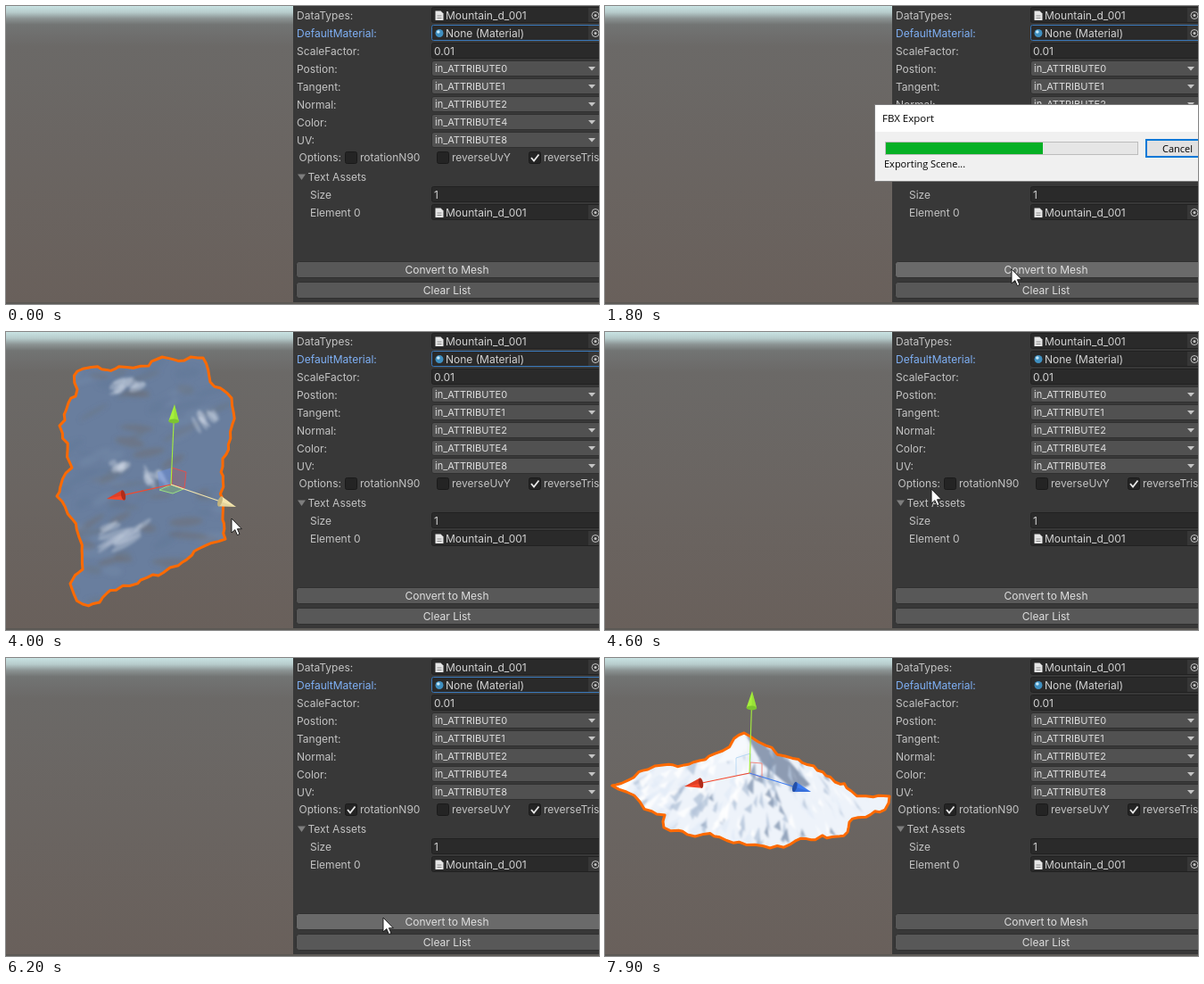
An HTML page that plays this animation: 665 by 334 pixels, repeating every 8.7 s.

```html
<!DOCTYPE html>
<html lang="en">
<head>
<meta charset="utf-8">
<title>Mesh converter</title>
<style>
html, body { margin: 0; width: 100%; height: 100%; overflow: hidden; background: #383838; }
svg { display: block; width: 665px; height: 334px; }
text { font: 12px Inter, sans-serif; fill: #c4c4c4; white-space: pre; }
.pop { font-size: 11px; fill: #dedede; }
.val { fill: #d2d2d2; }
.on { fill: #7fb0f5; }
.btn { text-anchor: middle; fill: #dedede; }
.dlg { font: 11px "Open Sans", sans-serif; fill: #000; }
.title { font-size: 11.5px; }
</style>
</head>
<body>
<svg id="stage" viewBox="0 0 665 334" xmlns="http://www.w3.org/2000/svg"></svg>
<script>
const LOOP = 8700, STEP = 100;

let seed = 7;
const rnd = (a = 0, b = 1) => {
  seed = (seed * 1664525 + 1013904223) >>> 0;
  return a + (b - a) * seed / 4294967296;
};

const rect = (x, y, w, h, fill, more = '') =>
  `<rect x="${x}" y="${y}" width="${w}" height="${h}" fill="${fill}" ${more}/>`;
const text = (x, y, s, cls = '') => `<text x="${x}" y="${y}" class="${cls}">${s}</text>`;
const path = (d, fill, more = '') => `<path d="${d}" fill="${fill}" ${more}/>`;
const line = (d, color, more = '') => path(d, 'none', `stroke="${color}" ${more}`);
const blob = (x, y, rx, ry, a, fill, o) =>
  `<ellipse rx="${rx}" ry="${ry}" fill="${fill}" opacity="${o}" transform="translate(${x} ${y}) rotate(${a})"/>`;
const group = (id, body) => `<g id="${id}" visibility="hidden">${body}</g>`;
const repeat = (n, fn) => Array.from({ length: n }, (_, i) => fn(i)).join('');

// Closed outline: every edge is split at random until its pieces are short
function rough(points) {
  const p = points.split(' ').map(s => s.split(',').map(Number));
  const split = (a, b) => {
    const dx = b[0] - a[0], dy = b[1] - a[1], len = Math.hypot(dx, dy);
    if (len < 10) return [a];
    const k = rnd(-1, 1) * Math.min(.2, 3.5 / len), f = rnd(.4, .6);
    const m = [a[0] + dx * f - dy * k, a[1] + dy * f + dx * k];
    return [...split(a, m), ...split(m, b)];
  };
  return 'M' + p.flatMap((a, i) => split(a, p[(i + 1) % p.length]))
    .map(q => q.map(n => n.toFixed(1)).join(' ')).join('L') + 'Z';
}

/* Scene */
const cliff = rough('80,44 160,38 168,31 221,29 229,56 253,74 254,103 243,142 246,232 ' +
  '216,243 184,264 105,303 86,305 72,282 86,266 82,230 57,184 74,152 60,105 78,72');
const peak = rough('156,84 172,94 202,110 258,139 276,149 319,155 314,170 274,184 272,195 ' +
  '185,213 101,200 66,190 67,176 39,161 24,150 8,143 48,125 106,115 132,104');

function cliffBody() {
  const tones = ['#737983', '#8096b8', '#677d9f', '#77736f'];
  const soft = repeat(90, i =>
    blob(rnd(62, 248), rnd(40, 300), rnd(8, 24), rnd(2, 6), rnd(-35, 12), tones[i % 4], .42));
  // Snow patches: x, y, size
  const glow = [[137, 61, 15], [225, 98, 14], [167, 164, 13], [130, 224, 28], [128, 150, 9]]
    .map(([x, y, s]) => repeat(9, () => blob(x + rnd(-s, s), y + rnd(-.5, .5) * s,
      s * rnd(.4, .8), rnd(2, 5), (x > 140 ? 55 : -25) + rnd(-15, 15), '#dde7f4', .4))).join('');
  return path(cliff, '#7087a9') +
    `<g clip-path="url(#cliffClip)"><g filter="url(#soft)">${soft}</g><g filter="url(#fine)">${glow}</g></g>`;
}

// Streaks run downhill from the summit; ridges alternate light and dark
function peakBody() {
  const tones = ['#ffffff', '#e3ecf7', '#b4c4da', '#8597b2'];
  const streaks = repeat(330, () => {
    const x = rnd(8, 320), y = rnd(90, 208), side = (x - 157) / 150, l = rnd(8, 24);
    const flank = Math.exp(-(((x - 196) / 30) ** 2)) * .4;
    const shade = rnd(0, .75) + flank + .2 * Math.sin(x * .17 + y * .08);
    const fill = tones[Math.max(0, Math.min(3, Math.floor(shade * 4 - .3)))];
    return path(`M${x} ${y}l${side * l + rnd(-4, 4)} ${l}l${-rnd(3, 9)} ${-l * .4}Z`, fill, 'opacity=".8"');
  });
  return path(peak, '#eef3fa') + `<g clip-path="url(#peakClip)"><g filter="url(#edge)">` +
    path('M158 86L200 108L230 142L214 150L176 118Z', '#8d9bb2') + streaks +
    path('M156 85L134 105L126 118L146 114L160 98Z', '#f6f9fd') + '</g></g>';
}

const outline = d => line(d, '#ff6a00', 'stroke-width="3" stroke-linejoin="round"');

// Gizmo arm from (x, y) with a cone whose tip is at (u, v)
function arm(x, y, u, v, color, dark) {
  const a = Math.atan2(v - y, u - x), L = 19;
  return line(`M${x} ${y}L${u - L * Math.cos(a)} ${v - L * Math.sin(a)}`, color, 'stroke-width="1.1"') +
    `<g transform="translate(${u} ${v}) rotate(${a * 180 / Math.PI})">` +
    path(`M0 0L${-L} -5.8V5.8Z`, color) + path(`M0 0L${-L} 0V5.8Z`, dark, 'opacity=".3"') +
    blob(-L, 0, 2.4, 5.8, 0, dark, 1) + '</g>';
}
const RED = ['#f5482c', '#b02c1a'], GREEN = ['#a6f03c', '#7cc430'],
  BLUE = ['#3f7df0', '#2450a8'], GOLD = ['#f4e6ae', '#c4b47c'];

const gizmoA =
  path('M170 157L186 152V171L172 176Z', '#6f97ea', 'opacity=".4"') +
  path('M186 171V152L202 157L200 175Z', '#c0504c', 'fill-opacity=".25" stroke="#e2504c"') +
  path('M172 177L185 171L199 176L187 181Z', '#8fd060', 'fill-opacity=".3" stroke="#9be080"') +
  arm(185, 171, 189, 81, ...GREEN) + arm(185, 171, 113, 187, ...RED);
const gizmoB =
  line('M147 132V112L163 107V129Z', '#b8d8f4') +
  line('M163 117L176 118V134L163 129Z', '#f08a80') +
  arm(162, 129, 165, 37, ...GREEN) + arm(162, 129, 89, 144, ...RED) + arm(162, 129, 231, 150, ...BLUE);

/* Inspector panel */
const field = (y, s, x = 480) =>
  rect(477.5, y + .5, 200, 17, '#2a2a2a', 'rx="2" stroke="#212121"') + text(x, y + 13.5, s, 'val');
const picker = y => rect(653, y + 1, 20, 16, '#373737') +
  `<circle cx="661" cy="${y + 9.5}" r="4" fill="none" stroke="#c4c4c4"/><circle cx="661" cy="${y + 9.5}" r="1.5" fill="#c4c4c4"/>`;
const page = y => path(`M481.5 ${y + 4.5}h6l3 3v7.5h-9Z`, '#e6e6e6') +
  line(`M483.5 ${y + 10}h5M483.5 ${y + 12.5}h5`, '#8a8a8a');
const asset = y => field(y, 'Mountain_d_001', 493) + page(y) + picker(y);
const popup = (y, s) => rect(477.5, y + .5, 200, 17, '#515151', 'rx="2.5" stroke="#303030"') +
  text(481, y + 13, s, 'pop') + path(`M653 ${y + 7}h8l-4 4.5Z`, '#c4c4c4');
const box = (x, s) => rect(x + .5, 163.5, 13, 13, '#242424', 'rx="2" stroke="#1a1a1a"') + text(x + 17, 174, s);
const tick = x => line(`M${x + 3} 170l3 3.5l5.5 -7`, '#e8e8e8', 'stroke-width="1.8"');
const button = (y, s, fill) => rect(325.5, y + .5, 345, 18, fill, 'rx="3" stroke="#303030"') +
  text(494.5, y + 14, s, 'btn');

const labels = ['DataTypes:', 'DefaultMaterial:', 'ScaleFactor:', 'Postion:', 'Tangent:', 'Normal:', 'Color:', 'UV:'];
const panel = rect(322, 0, 343, 332, '#383838') +
  labels.map((s, i) => text(326, 15 + i * 20, s, i === 1 ? 'on' : '')).join('') +
  asset(1) + field(21, 'None (Material)', 493) + picker(21) +
  '<circle cx="486" cy="30.5" r="4.5" fill="#3f8fc0"/><circle cx="484.8" cy="29" r="1.8" fill="#c4e8f8"/>' +
  field(41, '0.01') +
  [0, 1, 2, 4, 8].map((n, i) => popup(61 + i * 20, 'in_ATTRIBUTE' + n)).join('') +
  text(328.5, 174, 'Options:') + box(380, 'rotationN90') + box(483, 'reverseUvY') + box(586, 'reverseTris') + tick(586) +
  path('M327 188.5h9l-4.5 6.5Z', '#7e7e7e') + text(338.5, 196, 'Text Assets') +
  text(341, 216, 'Size') + field(202, '1') + text(341, 236, 'Element 0') + asset(222) +
  button(286, 'Convert to Mesh', '#585858') + button(309, 'Clear List', '#585858');

const dialog = rect(302.5, 110.5, 400, 86, '#f0f0f0', 'stroke="#7d7d7d"') +
  rect(303, 111, 400, 30, '#fff') + text(311, 130, 'FBX Export', 'dlg title') +
  rect(314.5, 152.5, 283, 14, '#e6e6e6', 'stroke="#bcbcbc"') + rect(315, 153, 176, 13, '#06b025') +
  text(313, 181, 'Exporting Scene...', 'dlg') +
  rect(607, 150, 80, 19, '#e1e1e1', 'stroke="#0078d7" stroke-width="2"') + text(625, 164, 'Cancel', 'dlg');

const sky = [[0, '#c9e3e3'], [7, '#b7cccc'], [14, '#8b9393'], [21, '#727473'], [45, '#6b6967'], [334, '#69605b']]
  .map(([y, c]) => `<stop offset="${y / 334}" stop-color="${c}"/>`).join('');
const blur = (id, s) => `<filter id="${id}" x="-10%" y="-10%" width="120%" height="120%"><feGaussianBlur stdDeviation="${s}"/></filter>`;
const clip = (id, d) => `<clipPath id="${id}"><path d="${d}"/></clipPath>`;

const stage = document.getElementById('stage');
stage.innerHTML =
  `<defs><linearGradient id="sky" x2="0" y2="1">${sky}</linearGradient>` +
  blur('soft', 2.5) + blur('fine', 1.8) + blur('edge', 1) + clip('cliffClip', cliff) + clip('peakClip', peak) + '</defs>' +
  rect(0, 0, 322, 334, 'url(#sky)') + rect(0, 332, 665, 2, '#5c5955') +
  group('cliff', cliffBody()) +
  group('cliffPick', path(cliff, '#3c4452', 'opacity=".12"') + outline(cliff) + gizmoA) +
  group('axisIdle', arm(185, 171, 258, 196, ...BLUE)) + group('axisHot', arm(185, 171, 258, 196, ...GOLD)) +
  group('peak', peakBody()) + group('peakPick', outline(peak) + gizmoB) +
  panel +
  group('focus', rect(477.5, 21.5, 200, 17, 'none', 'rx="2" stroke="#3a79bb"')) +
  group('rotated', tick(380)) +
  group('hover', button(286, 'Convert to Mesh', '#6a6a6a')) +
  group('dialog', dialog) +
  path('M0 0V16L3.8 12.6L6.4 18.6L9 17.5L6.4 11.7H11.3Z', '#fff', 'id="cursor" stroke="#111" stroke-width=".9"');

/* Timeline */
const shown = {
  cliff: [[2100, 4200]], cliffPick: [[2900, 4200]],
  axisIdle: [[2900, 4000]], axisHot: [[4000, 4200]],
  peak: [[6300, LOOP]], peakPick: [[7100, LOOP]],
  focus: [[0, 4500], [4900, 7700]],
  rotated: [[4900, LOOP]],
  hover: [[1600, 2200], [5700, 6700]],
  dialog: [[1800, 1900], [6000, 6200]],
};
// start, end, target x, target y
const moves = [
  [0, 800, 456, 295], [1200, 1200, 445.5, 285.5], [1400, 1400, 456, 295],
  [2100, 2600, 205, 185], [3900, 4000, 253, 209], [4000, 4800, 387, 170],
  [4900, 5400, 423, 291], [6600, 6900, 149, 158], [7400, 7900, 680, 92],
];
const parts = Object.entries(shown).map(([id, spans]) => [document.getElementById(id), spans]);
const cursor = document.getElementById('cursor');

function cursorAt(t) {
  let x = 668, y = 116;
  for (const [a, b, u, v] of moves) {
    if (t < a) break;
    const k = t >= b ? 1 : (t - a) / (b - a), e = k * k * (3 - 2 * k);
    x += (u - x) * e;
    y += (v - y) * e;
  }
  return [x, y];
}

const start = performance.now();
function draw() {
  const t = Math.floor((performance.now() - start) % LOOP / STEP) * STEP;
  for (const [el, spans] of parts) {
    el.setAttribute('visibility', spans.some(([a, b]) => t >= a && t < b) ? 'visible' : 'hidden');
  }
  cursor.setAttribute('transform', `translate(${cursorAt(t)})`);
  requestAnimationFrame(draw);
}
draw();
</script>
</body>
</html>
```
